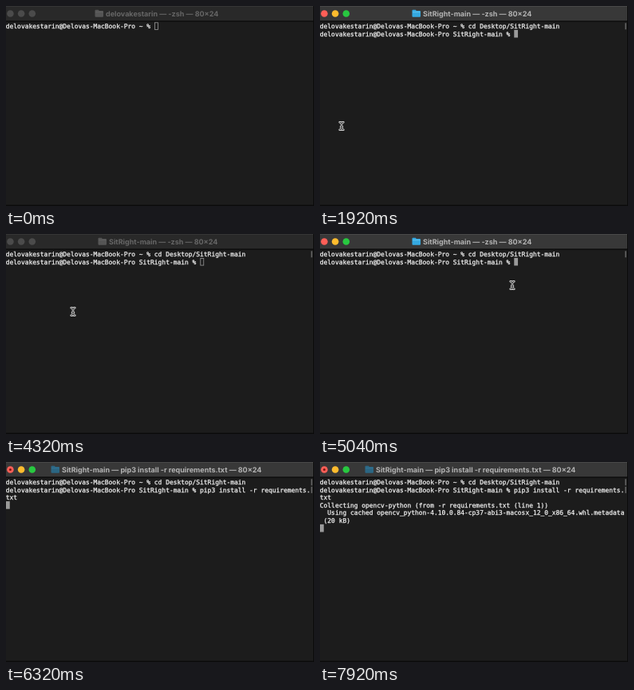
Write an HTML page with a canvas that moves like this. It is 386x250 px and loops after 8 s.

```html
<!DOCTYPE html>
<html lang="en">
<head>
<meta charset="utf-8">
<title>Terminal</title>
<style>
html, body { margin: 0; width: 100%; height: 100%; overflow: hidden; background: #1c1c1c; }
canvas { display: block; width: 386px; height: 250px; }
</style>
</head>
<body>
<canvas id="stage"></canvas>
<script>
const LOOP = 8000, TICK = 80;
const COL = 4.77, ROW = 9.6, TOP = 20.3;
const canvas = document.getElementById('stage');
const ctx = canvas.getContext('2d');
const dpr = window.devicePixelRatio || 1;
canvas.width = 386 * dpr;
canvas.height = 250 * dpr;
ctx.scale(dpr, dpr);
ctx.textRendering = 'geometricPrecision';

const HOST = 'delovakestarin@Delovas-MacBook-Pro ';
const HOME = HOST + '~ % ';
const PROJECT = HOST + 'SitRight-main % ';
const CD = 'cd Desktop/SitRight-main';
const PIP = 'pip3 install -r requirements.txt';
const COLLECT = 'Collecting opencv-python (from -r requirements.txt (line 1))';
const CACHED = '  Using cached opencv_python-4.10.0.84-cp37-abi3-macosx_12_0_x86_64.whl.metadata';

// Event times in ms
const AT = { focus: 480, type: 1200, typed: 1600, enter: 1680, blur: 2320,
  refocus: 5040, paste: 5440, run: 6160, collect: 7600, cached: 7760 };

// Pointer strokes: [time, x, y] points; the pointer is hidden between strokes
const STROKES = [
  [[320, 70, 175], [720, 190, 74], [880, 190, 74], [1120, 193, 65], [1199, 193, 65]],
  [[1760, 160, 72], [1920, 27, 150], [2080, 10, 148], [2240, -8, 135]],
  [[4320, 84, 97], [4400, 196, 79], [4560, 196, 79], [4640, 215, 71], [4720, 232, 62],
   [4880, 232, 62], [5200, 250, 66], [5680, 273, 48], [6000, 285, 44], [6159, 288, 42]],
  [[6640, 263, 46], [6960, 170, 121], [7280, 40, 60], [7440, 60, 14], [7519, 60, 14]]
];

function pointerAt(t) {
  const s = STROKES.find(s => t >= s[0][0] && t <= s[s.length - 1][0]);
  if (!s) return null;
  const i = Math.max(1, s.findIndex(p => p[0] >= t));
  const [t0, x0, y0] = s[i - 1], [t1, x1, y1] = s[i];
  const k = (t - t0) / (t1 - t0);
  return [x0 + (x1 - x0) * k, y0 + (y1 - y0) * k];
}

function rect(x, y, w, h, color) {
  ctx.fillStyle = color;
  ctx.fillRect(x, y, w, h);
}

function disc(x, y, r, color) {
  ctx.fillStyle = color;
  ctx.beginPath();
  ctx.arc(x, y, r, 0, 2 * Math.PI);
  ctx.fill();
}

function write(text, col, row, color = '#f4f4f4') {
  ctx.font = '7.92px "DejaVu Sans Mono", monospace';
  ctx.fillStyle = ctx.strokeStyle = color;
  ctx.lineWidth = 0.25;
  [...text].forEach((ch, i) => {
    const x = (col + i) * COL - 0.2, y = TOP + row * ROW + 7.7;
    ctx.fillText(ch, x, y);
    ctx.strokeText(ch, x, y);
  });
}

function selected(text, col, row) {
  rect(col * COL, TOP + row * ROW, text.length * COL, ROW, '#fff');
  write(text, col, row, '#111');
}

function caret(col, row, active) {
  const x = col * COL, y = TOP + row * ROW;
  if (active) return rect(x, y, COL, ROW, '#9a9a9a');
  ctx.strokeStyle = '#969696';
  ctx.lineWidth = 0.8;
  ctx.strokeRect(x + 0.5, y + 0.5, COL - 0.8, ROW - 0.9);
}

function mark(row) {
  rect(382.6, TOP + row * ROW + 1, 0.9, 8, '#999');
}

function folder(x, color, light) {
  ctx.fillStyle = color;
  ctx.beginPath();
  ctx.roundRect(x, 4.8, 5, 4, 1);
  ctx.roundRect(x, 5.9, 10.5, 7.8, 1);
  ctx.fill();
  rect(x + 0.5, 7.4, 9.5, 0.7, light);
}

function titleBar(t, active) {
  const running = t >= AT.run;
  rect(0, 0, 386, 18.6, active ? '#383838' : '#292929');
  rect(0, 0, 386, 0.7, active ? '#505050' : '#3c3c3c');
  rect(0, 18.6, 386, 1, '#060606');
  ['#ff5f57', '#febc2e', '#28c840'].forEach((c, i) =>
    disc(5.4 + i * 13.7, 9.5, 4.3, active ? c : '#4b4b4b'));
  if (running) disc(5.4, 9.5, 1.5, '#7c1510');

  const [x, name] = running ? [70, 'SitRight-main — ' + PIP]
    : t >= AT.enter ? [129, 'SitRight-main — -zsh'] : [125, 'delovakestarin — -zsh'];
  if (!active) folder(x - 13.5, '#555', '#666');
  else if (running) folder(x - 13.5, '#2b6683', '#38799a');
  else folder(x - 13.5, '#35a9e1', '#6fcdf5');
  ctx.font = '700 9px Inter, sans-serif';
  ctx.fillStyle = active ? '#b4b4b4' : '#676767';
  ctx.fillText(name + ' — 80×24', x, 12.6);
}

function shell(t, active) {
  if (t < AT.enter) {
    const k = Math.min(1, Math.max(0, (t - AT.type + TICK) / (AT.typed - AT.type)));
    const line = HOME + CD.slice(0, Math.round(k * CD.length));
    write(line, 0, 0);
    return caret(line.length, 0, active);
  }
  write(HOME + CD, 0, 0);
  mark(0);
  write(PROJECT, 0, 1);
  const start = PROJECT.length, room = 80 - start;
  if (t < AT.paste) return caret(start, 1, active);

  const put = t < AT.run ? selected : write;
  put(PIP.slice(0, room), start, 1);
  put(PIP.slice(room), 0, 2);
  if (t < AT.run) return caret(PIP.length - room, 2, active);

  mark(1);
  let row = 3;
  if (t >= AT.collect) write(COLLECT, 0, row++);
  if (t >= AT.cached) {
    write(CACHED, 0, row++);
    write(' (20 kB)', 0, row++);
  }
  caret(0, row, active);
}

function pointer([x, y]) {
  ctx.save();
  ctx.translate(x, y);
  ctx.lineCap = 'round';
  const beam = new Path2D('M-2.3-4.8Q0-4.8 0-3Q0-4.8 2.3-4.8M0-3V3M-2.3 4.8Q0 4.8 0 3Q0 4.8 2.3 4.8M-1 1.2H1');
  for (const [color, width] of [['#f5f5f5', 2.5], ['#111', 0.9]]) {
    ctx.strokeStyle = color;
    ctx.lineWidth = width;
    ctx.stroke(beam);
  }
  ctx.restore();
}

function draw(now) {
  const t = Math.floor((now % LOOP) / TICK) * TICK;
  const active = (t >= AT.focus && t < AT.blur) || t >= AT.refocus;
  rect(0, 0, 386, 250, '#1c1c1c');
  titleBar(t, active);
  shell(t, active);
  rect(385, 0, 1, 250, '#0b0b0b');
  rect(0, 248.6, 386, 1.4, '#0b0b0b');
  const p = pointerAt(t);
  if (p) pointer(p);
}

const begin = performance.now();
function frame() {
  draw(performance.now() - begin);
  requestAnimationFrame(frame);
}
frame();
</script>
</body>
</html>
```
